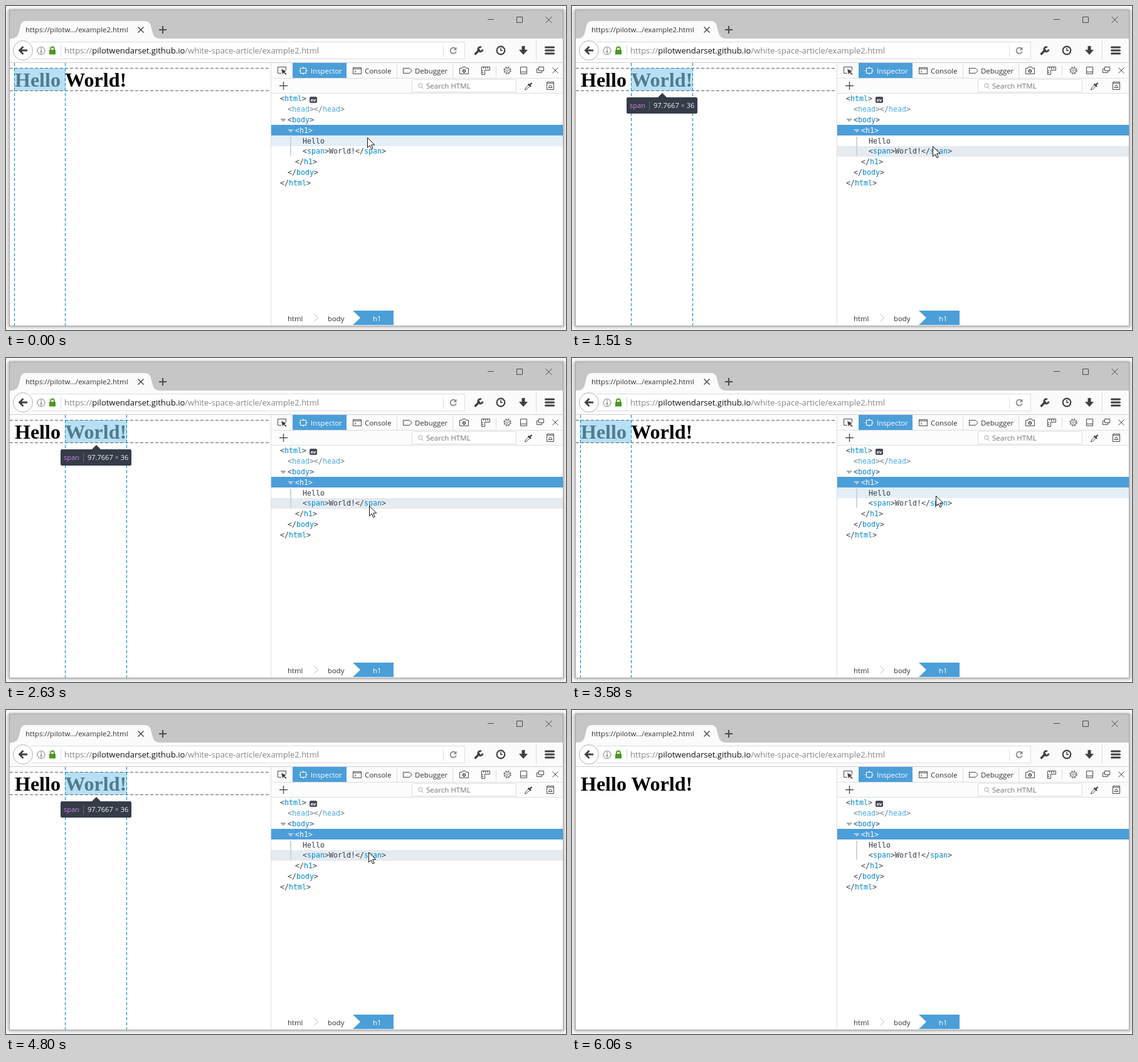
An HTML page for the animation above (7150 ms loop, 893 by 518 pixels).

```html
<!DOCTYPE html>
<html lang="en">
<head>
<meta charset="utf-8">
<title>White space in the inspector</title>
<style>
  html, body { margin: 0; width: 100%; height: 100%; overflow: hidden; background: #fff; }
  svg { display: block; width: 100%; height: 100%; }
  text { font-family: "Open Sans", "Noto Sans", sans-serif; white-space: pre; }
  .ui { font-size: 11.4px; fill: #333; }
  .tip { font-size: 11px; }
  .url { font-size: 13px; fill: #858585; }
  .page { font: bold 32px "Liberation Serif", "Times New Roman", serif; }
  .code text { font: 11.63px "DejaVu Sans Mono", "Liberation Mono", monospace; fill: #393f4c; }
  .code .name { fill: #0088cc; }
  .code .dim { opacity: .7; }
  .code .sel, .code .sel .name { fill: #fff; }
  .line { fill: none; stroke: #4a4a4a; stroke-width: 1; }
  .rule { fill: none; stroke: #dadde0; }
  .guide { fill: none; stroke: #0088cc; stroke-dasharray: 5 3; }
  .across { stroke: #55607f; }
</style>
</head>
<body>
<svg viewBox="0 0 893 518" xmlns="http://www.w3.org/2000/svg">
  <defs>
    <filter id="soft" x="-5%" y="-5%" width="110%" height="110%"><feGaussianBlur stdDeviation="2"/></filter>
  </defs>

  <!-- Window -->
  <rect x="2" y="4" width="890" height="511" rx="5" fill="#c4c4c4" filter="url(#soft)"/>
  <rect x="5.5" y="6.5" width="883" height="505" fill="#fff" stroke="#a3a3a3"/>
  <rect x="6" y="7" width="882" height="45" fill="#c6c6c6"/>
  <path d="M8 52C19 52 20 45 22 36S25 24 34 24H220C229 24 230 28 232 36S235 52 246 52Z" fill="#fbfbfb"/>
  <rect x="6" y="52" width="882" height="38" fill="#fbfbfb"/>
  <path d="M6 90.5H888" stroke="#cfcfcf"/>
  <text class="ui" x="31" y="42" fill="#444">https://pilotw.../example2.html</text>
  <path class="line" stroke-width="1.5" d="M210.500 33.500l9 9m0-9l-9 9" style="stroke-width:1.5"/>
  <path class="line" style="stroke-width:2" d="M244 38h12m-6-6v12"/>
  <path class="line" d="M768 21.500h10M814.500 17.500h9v9h-9zM860.500 17l10 10m0-10l-10 10"/>

  <!-- Address bar -->
  <path d="M40 57.500H731.500V84.500H40" fill="#fff" stroke="#dcdcdc"/>
  <circle cx="27" cy="71" r="15.500" fill="#fff" stroke="#b4b4b4"/>
  <path d="M34 71H22M27.500 65l-6 6 6 6" fill="none" stroke="#404040" stroke-width="2.800"/>
  <circle class="line" cx="56" cy="71.500" r="6" style="stroke:#777"/>
  <path d="M56 67.500v1.700M56 70.500v5" stroke="#777" stroke-width="1.500"/>
  <rect x="69" y="70" width="10" height="7.500" rx="1" fill="#4d9a1f"/>
  <path d="M71 70v-1.500a3 3 0 0 1 6 0V70" fill="none" stroke="#4d9a1f" stroke-width="1.800"/>
  <path class="rule" d="M87.500 62v19M697.500 62v19"/>
  <text class="url" x="93" y="76">https://<tspan fill="#111">pilotwendarset.github.io</tspan>/white-space-article/example2.html</text>
  <path d="M717 68.500a4.700 4.700 0 1 0 .8 4.300" fill="none" stroke="#858585" stroke-width="1.700"/>
  <path d="M718.500 65.500v5h-5z" fill="#858585"/>
  <path d="M748.500 76.500l6-6" stroke="#404040" stroke-width="3.400" stroke-linecap="round"/>
  <path d="M758 66a3.600 3.600 0 1 0 2 3.500" fill="none" stroke="#404040" stroke-width="2.800"/>
  <circle cx="789" cy="71" r="6.300" fill="#fff" stroke="#404040" stroke-width="2.200"/>
  <path d="M789 67v4.300h3" fill="none" stroke="#404040" stroke-width="1.500"/>
  <path d="M822.500 64h5v6h4.500l-7 8-7-8h4.500z" fill="#404040"/>
  <path class="rule" d="M845.500 55v32"/>
  <path d="M860.500 66h13m-13 5h13m-13 5h13" stroke="#404040" stroke-width="3" stroke-linecap="round"/>

  <!-- Page -->
  <text class="page" x="14" y="129">Hello World!</text>
  <g id="marks">
    <rect id="box" y="99" height="37" fill="#87ceeb" opacity=".6"/>
    <path class="guide across" d="M6 99.500H422M6 135.500H422"/>
    <path id="sides" class="guide"/>
  </g>
  <g id="tip">
    <path d="M144 139l8 8H136z" fill="#353c48"/>
    <rect x="87" y="146" width="113" height="26" rx="2.500" fill="#353c48"/>
    <path d="M123.500 152v14" stroke="#626a76"/>
    <text class="tip" x="92" y="163" fill="#d184ea">span</text>
    <text class="tip" x="130" y="163" fill="#f3f5f8">97.7667 <tspan fill="#8fb9de">×</tspan> 36</text>
  </g>

  <!-- Tool panel -->
  <rect x="423" y="91" width="465" height="48" fill="#fcfcfc"/>
  <path class="rule" d="M422.500 91V511M423 115.500H888M423 139.500H888M623.500 92v23M712.500 92v23M781.500 95v17"/>
  <rect x="457" y="91" width="86" height="24" fill="#4c9ed9"/>
  <text class="ui" x="486" y="108" style="fill:#fff">Inspector</text>
  <text class="ui" x="572" y="108">Console</text>
  <text class="ui" x="652" y="108">Debugger</text>
  <path class="line" d="M439 107.500h-5.500v-10h13v5"/>
  <path d="M439 101l8 3-3 1.300 3.500 3.500-1.300 1.300-3.500-3.500-1.500 2.900z" fill="#404040"/>
  <path class="line" style="stroke:#fff" d="M469.500 99.500h9v8h-9zM474 97v2.500m0 8v2.500M467 103.500h2.500m9 0h2.500"/>
  <path class="line" d="M553.500 98.500h13v10h-13zM553.500 100.500h13M556 103l2 1.800-2 1.800M633.500 99.500h9.500l4.500 4-4.500 4h-9.500z"/>
  <path class="line" d="M723.500 99.500h3.500l1-2h5l1 2h3.500v9h-14z"/>
  <circle class="line" cx="730.500" cy="104" r="2" style="stroke-width:1.600"/>
  <path class="line" d="M758.500 97.500h13v5h-8v7h-5zM761.500 98v2m3-2v3m3-3v2M759 103.500h2m-2 3h2"/>
  <circle class="line" cx="799.500" cy="103" r="5" style="stroke:#777;stroke-width:2.500;stroke-dasharray:2.200 1.730"/>
  <circle class="line" cx="799.500" cy="103" r="4.200" style="stroke:#777"/>
  <circle class="line" cx="799.500" cy="103" r="1.700" style="stroke:#777"/>
  <path class="line" d="M820.500 97.500h10v11h-10zM820.500 105.500h10M849.500 97.500h8v6h-8zM849.500 100.500h-3v6h8v-3M871.500 98.500l9 9m0-9l-9 9"/>
  <path class="line" style="stroke-width:1.300" d="M436 127.500h13m-6.500-6.500v13"/>
  <rect x="647.500" y="117.500" width="166" height="20" rx="1" fill="#fff" stroke="#dadde0"/>
  <path class="line" style="stroke:#aaa" d="M662.500 129.500l3 3M664 127a3.200 3.200 0 1 1-6.400 0a3.200 3.200 0 1 1 6.400 0"/>
  <text class="ui" x="670" y="132" style="fill:#707673;font-size:11.55px">Search HTML</text>
  <path d="M827.500 134l1-3 5.500-5.500 2 2-5.500 5.500z" class="line"/>
  <path d="M832.500 124.500l4.500 4.500M835.500 126l3-3" stroke="#404040" stroke-width="2.200"/>
  <path class="line" d="M862.500 121.500h11v12h-11zM862.500 123.500h11M865 130.500l3-4.500 3 4.500z"/>

  <!-- Markup tree -->
  <rect id="hover" x="423" width="465" height="17"/>
  <rect x="423" y="190" width="465" height="17" fill="#4c9ed9"/>
  <rect x="453" y="209" width="2" height="30" fill="#cfd3da"/>
  <path d="M437 180h10l-5 5.500z" fill="#a9aeb3"/>
  <path d="M449 197h10l-5 5.500z" fill="#a9cbe6"/>
  <g id="tree" class="code"></g>
  <rect x="484" y="145" width="12" height="10" rx="2" fill="#454b56"/>
  <text x="485.700" y="152.500" font-size="7.500" font-weight="bold" fill="#fff">ev</text>

  <!-- Breadcrumbs -->
  <path d="M553 487H618V510H553L565 498.500Z" fill="#4c9ed9"/>
  <path class="line" style="stroke:#b5b9bd" d="M491.500 492.500l6 6-6 6"/>
  <text class="ui" x="449" y="504">html</text>
  <text class="ui" x="513" y="504">body</text>
  <text class="ui" x="585" y="504" style="fill:#fff">h1</text>

  <path id="cursor" d="M.5.5V16.500L4.200 13L6.800 18.700L9.200 17.700L6.600 12H11.800Z" fill="#fff" stroke="#111"/>
</svg>
<script>
const LOOP = 7150;
const $ = id => document.getElementById(id);

// Markup rows: x, baseline, text, class
const rows = [
  [437, 152, '<html>'], [449, 169, '<head></head>', 'dim'], [449, 186, '<body>'],
  [461, 203, '<h1>', 'sel'], [473, 220, 'Hello'], [473, 236, '<span>World!</span>'],
  [461, 253, '</h1>'], [449, 270, '</body>'], [437, 287, '</html>']
];
const paint = s => s.replace(/<(\/?)(\w+)>/g, '&lt;$1<tspan class="name">$2</tspan>&gt;');
$('tree').innerHTML = rows.map(([x, y, s, c = '']) =>
  `<text x="${x}" y="${y}" class="${c}">${paint(s)}</text>`).join('');

// Pointer tip: time, x, y
const path = [
  [0, 576, 210], [640, 576, 210], [980, 575, 231], [1480, 575, 228], [1510, 575, 224],
  [1609, 575, 224], [1720, 575, 213], [2300, 575, 213], [2340, 576, 217], [2389, 576, 217],
  [2630, 579, 236], [3380, 579, 236], [3580, 580, 220], [4610, 580, 220],
  [4800, 578, 227], [5460, 578, 227], [6050, 893, 238]
];
const EXIT = 6050;

function pointer(t) {
  const i = path.findIndex(k => k[0] > t);
  const [t0, x0, y0] = path[i - 1], [t1, x1, y1] = path[i];
  const p = (t - t0) / (t1 - t0);
  return [Math.round(x0 + (x1 - x0) * p), Math.round(y0 + (y1 - y0) * p)];
}

const show = (id, on) => $(id).setAttribute('visibility', on ? 'visible' : 'hidden');
const set = (id, attrs) => Object.entries(attrs).forEach(([k, v]) => $(id).setAttribute(k, v));

function draw(t) {
  const inside = t < EXIT;
  const [x, y] = inside ? pointer(t) : [893, 238];
  const active = inside && x < 888;
  const span = y >= 224;
  const [left, right] = span ? [94, 192] : [13, 94];

  show('cursor', inside);
  show('marks', active);
  show('hover', active);
  show('tip', active && span);
  set('cursor', { transform: `translate(${x} ${y})` });
  set('hover', { y: span ? 224 : 207, fill: span ? '#e5ebef' : '#e3eef6' });
  set('box', { x: left, width: right - left + 1 });
  set('sides', { d: `M${left + .5} 91V511M${right + .5} 91V511` });
}

const start = performance.now();
function tick() {
  draw((performance.now() - start) % LOOP);
  requestAnimationFrame(tick);
}
tick();
</script>
</body>
</html>
```
